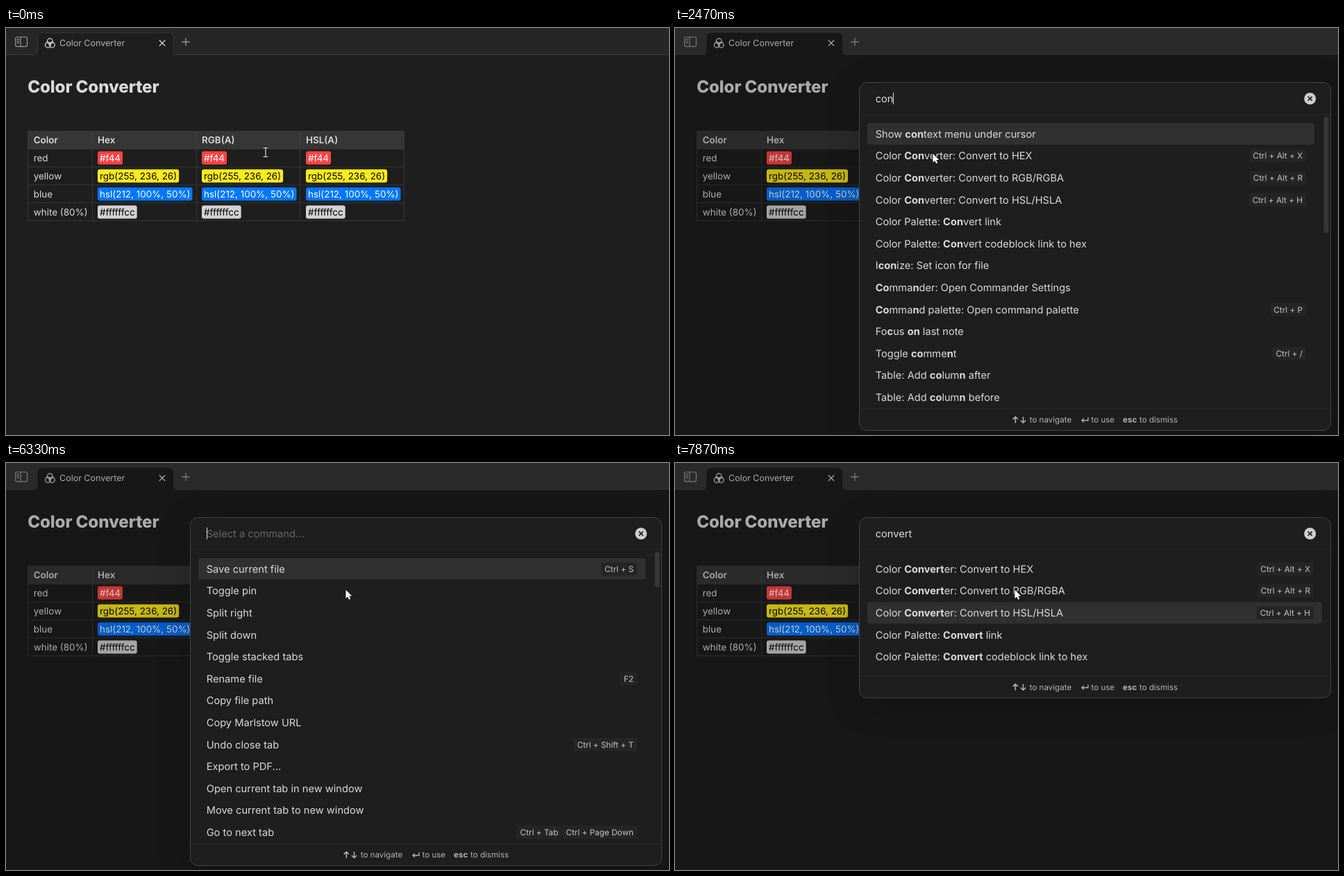
Animation of 955 by 586 pixels, one loop 8000 ms. Source, as an HTML page with a canvas:

```html
<!DOCTYPE html>
<html lang="en">
<head>
<meta charset="utf-8">
<title>Color Converter</title>
<style>
  html, body { margin: 0; width: 100%; height: 100%; overflow: hidden; background: #1e1e1e; }
  canvas { display: block; width: 955px; height: 586px; }
</style>
</head>
<body>
<canvas id="stage"></canvas>
<script>
const W = 955, H = 586, LOOP = 8000;
const canvas = document.getElementById('stage');
const ctx = canvas.getContext('2d');
const ratio = window.devicePixelRatio || 1;
canvas.width = W * ratio;
canvas.height = H * ratio;

const NOTE = 13.44, UI = 14.65, SMALL = 11.75;
const ROW = 31.6, FIRST_ROW = 152.5;
const LIGHT = '#dadada', MUTED = '#b3b3b3', FAINT = '#9a9a9a';

const DEFAULT_LIST = ['Save current file', 'Toggle pin', 'Split right', 'Split down',
  'Toggle stacked tabs', 'Rename file', 'Copy file path', 'Copy Marlstow URL',
  'Undo close tab', 'Export to PDF...', 'Open current tab in new window',
  'Move current tab to new window', 'Go to next tab'];
const SEARCH_LIST = ['Show context menu under cursor', 'Color Converter: Convert to HEX',
  'Color Converter: Convert to RGB/RGBA', 'Color Converter: Convert to HSL/HSLA',
  'Color Palette: Convert link', 'Color Palette: Convert codeblock link to hex',
  'Iconize: Set icon for file', 'Commander: Open Commander Settings',
  'Command palette: Open command palette', 'Focus on last note', 'Toggle comment',
  'Table: Add column after', 'Table: Add column before', 'Focus on tab group above'];
const HOTKEYS = {
  'Save current file': ['Ctrl + S'],
  'Rename file': ['F2'],
  'Undo close tab': ['Ctrl + Shift + T'],
  'Go to next tab': ['Ctrl + Tab', 'Ctrl + Page Down'],
  'Color Converter: Convert to HEX': ['Ctrl + Alt + X'],
  'Color Converter: Convert to RGB/RGBA': ['Ctrl + Alt + R'],
  'Color Converter: Convert to HSL/HSLA': ['Ctrl + Alt + H'],
  'Command palette: Open command palette': ['Ctrl + P'],
  'Toggle comment': ['Ctrl + /']
};

// Each step: start time and value; the latest one reached applies.
const QUERY = [[0, ''], [2330, 'c'], [2400, 'co'], [2470, 'con'], [2530, 'conv'],
  [2670, 'conve'], [2800, 'conver'], [2870, 'convert'],
  [6270, ''], [6670, 'c'], [6730, 'co'], [6800, 'con'], [6930, 'conv'],
  [7070, 'conve'], [7130, 'conver'], [7330, 'convert']];
const SELECTED = [[0, 0], [3530, 1], [6270, 0], [7800, 1], [7870, 2]];
const POINTER = [[0, ['beam', 374, 179]], [70, null], [1870, ['arrow', 371.5, 181]],
  [3800, ['beam', 374, 179]], [4530, ['beam', 412, 171]], [4600, ['beam', 466, 170]],
  [4670, ['beam', 500, 180]], [5730, null], [6270, ['arrow', 489.5, 182.5]]];
const NOTE_CARET = [[0, null], [600, [32, 315]], [670, null], [730, [320, 178]],
  [1330, null], [3800, [389.5, 178]], [4330, null], [4870, [389.5, 178]],
  [5070, null], [5200, [470, 178]], [5800, null]];

const at = (steps, t) => steps.reduce((v, s) => t >= s[0] ? s[1] : v, steps[0][1]);
const within = (t, a, b) => t >= a && t < b;

function setFont(size, weight = 400) {
  ctx.font = `${weight} ${size}px Inter, sans-serif`;
}

// Draws text centred on cy by cap height and returns its width.
function text(str, x, cy, size, color, weight = 400) {
  setFont(size, weight);
  ctx.fillStyle = color;
  ctx.fillText(str, x, cy + size * 0.364);
  return ctx.measureText(str).width;
}

function width(str, size, weight) {
  setFont(size, weight);
  return ctx.measureText(str).width;
}

function box(x, y, w, h, r, fill) {
  ctx.beginPath();
  ctx.roundRect(x, y, w, h, r);
  ctx.fillStyle = fill;
  ctx.fill();
}

function lines(color, lw, ...paths) {
  ctx.strokeStyle = color;
  ctx.lineWidth = lw;
  ctx.beginPath();
  for (const p of paths) {
    for (let i = 0; i < p.length; i += 2) {
      if (i) ctx.lineTo(p[i], p[i + 1]); else ctx.moveTo(p[i], p[i + 1]);
    }
  }
  ctx.stroke();
}

function cross(x, y, r, color, lw) {
  lines(color, lw, [x - r, y - r, x + r, y + r], [x + r, y - r, x - r, y + r]);
}

function drawTabBar(focused) {
  ctx.fillStyle = focused ? '#363636' : '#262626';
  ctx.fillRect(0, 0, W, 39);
  if (!focused) lines('#363636', 1, [0, 38.5, W, 38.5]);

  ctx.beginPath();
  ctx.moveTo(39, 38.5);
  ctx.quadraticCurveTo(45.5, 38.5, 45.5, 32);
  ctx.lineTo(45.5, 14);
  ctx.quadraticCurveTo(45.5, 7, 52.5, 7);
  ctx.lineTo(234, 7);
  ctx.quadraticCurveTo(241, 7, 241, 14);
  ctx.lineTo(241, 32);
  ctx.quadraticCurveTo(241, 38.5, 247.5, 38.5);
  ctx.fillStyle = '#1e1e1e';
  ctx.fill();
  if (!focused) {
    ctx.strokeStyle = '#363636';
    ctx.lineWidth = 1;
    ctx.stroke();
  }
  ctx.fillStyle = '#1e1e1e';
  ctx.fillRect(46, 37, 194.5, 3);

  ctx.strokeStyle = FAINT;
  ctx.lineWidth = 1.2;
  ctx.beginPath();
  ctx.roundRect(13.7, 13, 16.8, 13.6, 2);
  ctx.stroke();
  lines(FAINT, 1.2, [21, 13, 21, 26.6], [15.6, 16.3, 19, 16.3],
    [15.6, 18.8, 19, 18.8], [15.6, 21.3, 19, 21.3]);

  for (const [x, y] of [[63.3, 19.1], [60.4, 24.4], [66.3, 24.4]]) {
    ctx.beginPath();
    ctx.arc(x, y, 3.9, 0, Math.PI * 2);
    ctx.strokeStyle = LIGHT;
    ctx.lineWidth = 1.3;
    ctx.stroke();
  }
  text('Color Converter', 77, 21.5, 12.5, focused ? LIGHT : MUTED);
  cross(225, 21.7, 4.2, LIGHT, 1.3);
  lines(FAINT, 1.3, [253.3, 20, 264.7, 20], [259, 14.3, 259, 25.7]);
}

function pill(str, x, cy, bg, fg) {
  box(x, cy - 9.5, width(str, NOTE) + 6, 19, 3, bg);
  text(str, x + 3, cy, NOTE, fg);
}

// A hex value under the caret is set smaller and shifted as a tag.
function editedPill(x, cy, settled) {
  const left = settled ? x + 9 : x;
  box(left, cy - 9.5, x + 41 - left, 19, 3, '#ff4444');
  text('#f44', x + 12, cy, NOTE * 0.875, '#fff');
}

function drawNote(t) {
  ctx.letterSpacing = '-0.15px';
  text('Color Converter', 31.2, 84.5, 24.2, LIGHT, 800);
  ctx.letterSpacing = '0px';

  ctx.fillStyle = '#363636';
  ctx.fillRect(31, 148, 543, 26);
  const rules = [];
  for (let i = 0; i < 6; i++) rules.push([31, 148.5 + i * 25.8, 574, 148.5 + i * 25.8]);
  for (const x of [31.5, 124.5, 274.5, 423.5, 573.5]) rules.push([x, 148, x, 278]);
  lines('#363636', 1, ...rules);
  lines('#424242', 1, ...[124.5, 274.5, 423.5].map(x => [x, 149, x, 173]));

  const columns = [132, 282, 432];
  ['Color', 'Hex', 'RGB(A)', 'HSL(A)'].forEach((s, i) =>
    text(s, [39.7, ...columns][i], 161, NOTE, LIGHT, 600));

  const rows = [['red', '#f44', '#ff4444', '#fff'],
    ['yellow', 'rgb(255, 236, 26)', 'rgb(255,236,26)', '#000'],
    ['blue', 'hsl(212, 100%, 50%)', 'hsl(212,100%,50%)', '#fff'],
    ['white (80%)', '#ffffffcc', 'rgba(255,255,255,.8)', '#000']];
  rows.forEach(([name, code, bg, fg], r) => {
    const cy = 187 + r * 26;
    text(name, 39.7, cy, NOTE, LIGHT);
    columns.forEach((x, c) => {
      if (r === 0 && c === 1 && within(t, 730, 3800)) editedPill(x, cy, t >= 870);
      else if (r === 0 && c === 2 && t >= 5200) editedPill(x, cy, t >= 5330);
      else pill(r === 0 && c === 1 && t >= 3800 ? 'rgb(255, 68, 68)' : code, x, cy, bg, fg);
    });
  });
}

// Indices of matched characters, or null when the query does not fit.
function match(str, query) {
  const s = str.toLowerCase(), start = s.indexOf(query);
  if (start >= 0) return [...query].map((_, i) => start + i);
  const found = [];
  let from = 0;
  for (const ch of query) {
    const i = s.indexOf(ch, from);
    if (i < 0) return null;
    found.push(i);
    from = i + 1;
  }
  return found;
}

function drawCommand(str, marks, cy) {
  let x = 288.7, i = 0;
  while (i < str.length) {
    const bold = marks.includes(i);
    let j = i;
    while (j < str.length && marks.includes(j) === bold) j++;
    x += text(str.slice(i, j), x, cy, UI, LIGHT, bold ? 700 : 400);
    i = j;
  }
}

function drawHotkeys(keys, right, cy) {
  for (const key of [...keys].reverse()) {
    const w = width(key, SMALL);
    box(right - w - 10, cy - 9.5, w + 10, 19, 3.5, '#252525');
    text(key, right - w - 5, cy, SMALL, '#c4c4c4');
    right -= w + 11;
  }
}

function drawFooter(bottom) {
  const y = bottom - 15.3;
  lines('#252525', 1, [266, Math.round(bottom - 31) - .5, 944, Math.round(bottom - 31) - .5]);
  lines(MUTED, 1.5, [490.3, y + 4.5, 490.3, y - 4], [486.7, y - .8, 490.3, y - 4.3, 493.9, y - .8],
    [501.5, y - 4.5, 501.5, y + 4], [497.9, y + .8, 501.5, y + 4.3, 505.1, y + .8]);
  lines(MUTED, 1.3, [595, y - 3.6, 595, y + .8, 586, y + .8], [588.8, y - 2, 586, y + .8, 588.8, y + 3.6]);
  text('to navigate', 510.7, y, 11.6, MUTED);
  text('to use', 599.5, y, 11.6, MUTED);
  text('esc', 645, y, 11.6, MUTED, 700);
  text('to dismiss', 669, y, 11.6, MUTED);
}

function drawPalette(t) {
  const query = at(QUERY, t), selected = at(SELECTED, t);
  const list = (query ? SEARCH_LIST.filter(s => match(s, query)) : DEFAULT_LIST).slice(0, 13);
  const scrolls = list.length > 12;
  const bottom = scrolls ? 579.5 : 338 + (list.length - 5) * ROW;

  ctx.fillStyle = 'rgba(0,0,0,.22)';
  ctx.fillRect(0, 0, W, H);
  ctx.save();
  ctx.shadowColor = 'rgba(0,0,0,.2)';
  ctx.shadowBlur = 50 * ratio;
  ctx.shadowOffsetY = 10 * ratio;
  box(265.5, 78.5, 679, bottom - 78.5, 11, '#1e1e1e');
  ctx.restore();
  ctx.strokeStyle = '#444';
  ctx.lineWidth = 1;
  ctx.stroke();
  lines('#272727', 1, [266, 125, 944, 125]);

  const typed = query ? text(query, 288.7, 102, UI, LIGHT) : 0;
  if (!query) text('Select a command...', 288.7, 102, UI, '#666');
  if (!within(t, 3400, 3800) && t < 7870) {
    ctx.fillStyle = LIGHT;
    ctx.fillRect(Math.round(288.5 + typed), 93, 1, 17);
  }
  ctx.beginPath();
  ctx.arc(914.7, 101.7, 8.5, 0, Math.PI * 2);
  ctx.fillStyle = '#cfcfcf';
  ctx.fill();
  cross(914.7, 101.7, 3, '#1e1e1e', 1.7);

  const right = scrolls ? 921 : 932;
  list.forEach((name, i) => {
    const cy = FIRST_ROW + i * ROW;
    if (i === selected) box(277, cy - 15.5, right - 277, 31, 4, '#303030');
    drawCommand(name, query ? match(name, query) : [], cy);
    drawHotkeys(HOTKEYS[name] || [], right - 12, cy);
  });
  if (scrolls) {
    const end = query ? (t < 6000 ? 295 : 300) : 179;
    box(934.5, 128, 7, end - 128, 3.5, '#373737');
  }
  drawFooter(bottom);
}

function drawPointer(pointer) {
  if (!pointer) return;
  const [kind, x, y] = pointer;
  ctx.save();
  ctx.translate(x, y);
  if (kind === 'beam') {
    const shape = [[-3.5, -6.5, -.8, -6.5, 0, -5.7, .8, -6.5, 3.5, -6.5], [0, -6, 0, 6],
      [-3.5, 6.5, -.8, 6.5, 0, 5.7, .8, 6.5, 3.5, 6.5]];
    lines('rgba(0,0,0,.5)', 2.6, ...shape);
    lines('#f0f0f0', 1.2, ...shape);
  } else {
    ctx.beginPath();
    for (const [px, py] of [[0, 0], [0, 12.4], [2.8, 9.9], [4.7, 14.2], [6.8, 13.3], [4.9, 9.1], [8.8, 8.9]]) {
      ctx.lineTo(px, py);
    }
    ctx.closePath();
    ctx.fillStyle = '#fff';
    ctx.strokeStyle = '#111';
    ctx.lineWidth = 1.6;
    ctx.stroke();
    ctx.fill();
  }
  ctx.restore();
}

function draw(t) {
  ctx.setTransform(ratio, 0, 0, ratio, 0, 0);
  ctx.textRendering = 'geometricPrecision';
  ctx.fillStyle = '#1e1e1e';
  ctx.fillRect(0, 0, W, H);
  drawTabBar(t >= 600);
  drawNote(t);
  const caret = at(NOTE_CARET, t);
  const open = within(t, 1870, 3800) || t >= 6270;
  if (open) drawPalette(t);
  else if (caret) {
    ctx.fillStyle = LIGHT;
    ctx.fillRect(Math.floor(caret[0]), caret[1], 1, 17);
  }
  drawPointer(at(POINTER, t));
}

const began = performance.now();
function tick() {
  draw((performance.now() - began) % LOOP);
  requestAnimationFrame(tick);
}
tick();
</script>
</body>
</html>
```
